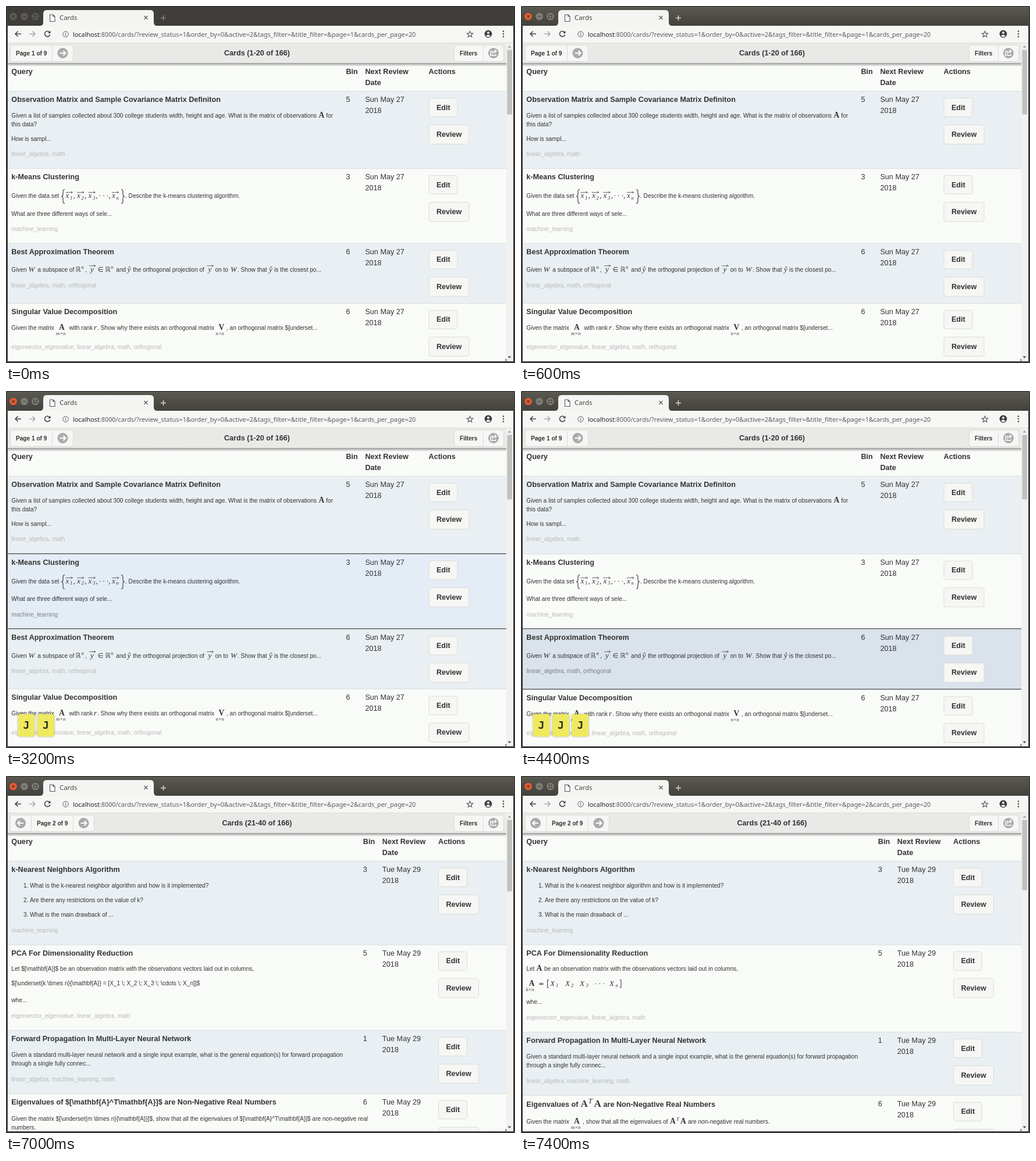
Animation of 875x614 px, one loop 8000 ms. Source, as an HTML page:

```html
<!DOCTYPE html>
<html lang="en">
<head>
<meta charset="utf-8">
<title>Cards</title>
<style>
html, body { margin: 0; width: 100%; height: 100%; overflow: hidden; background: #3c3b37; }
svg { display: block; width: 875px; height: 614px; }
text { font-family: "Liberation Sans", Arial, sans-serif; font-size: 10.12px; fill: #333; white-space: pre; }
.big { font-size: 12.65px; }
.bold { font-weight: bold; }
.mid { text-anchor: middle; }
.tag { fill: #b9bab9; }
.tag.on { fill: #7c7f82; }
.ui { font-family: "Noto Sans", "Open Sans", sans-serif; font-size: 10.85px; fill: #5c5c5c; }
.tab { font-size: 11.4px; fill: #444; }
.m, .mb, .sub { font-family: "Liberation Serif", Times, serif; font-size: 13.2px; }
.m, .sub { font-style: italic; }
.mb { font-weight: bold; font-size: 13.6px; }
.sub { font-size: 8.6px; }
.bb { font-family: "DejaVu Sans", sans-serif; font-size: 11.5px; }
.h { font-size: 17px; }
.key { font: bold 18px "DejaVu Sans Mono", monospace; fill: #2e2e20; text-anchor: middle; }
</style>
</head>
<body>
<svg id="stage" viewBox="0 0 875 614"></svg>
<script>
const escapeText = s => s.replace(/&/g, '&amp;').replace(/</g, '&lt;');
const text = (x, y, s, cls = '') => `<text x="${x}" y="${y}" class="${cls}">${escapeText(s)}</text>`;
const box = (x, y, w, h, fill, more = '') =>
  `<rect x="${x}" y="${y}" width="${w}" height="${h}" fill="${fill}" ${more}/>`;
const path = (d, stroke, width = 1, fill = 'none') =>
  `<path d="${d}" stroke="${stroke}" stroke-width="${width}" fill="${fill}"/>`;
const disc = (x, y, r, fill, more = '') => `<circle cx="${x}" cy="${y}" r="${r}" fill="${fill}" ${more}/>`;
const button = (x, y, w, h) => box(x + .5, y + .5, w - 1, h - 1, '#f6f7f4', 'stroke="#dadcd9" rx="3.5"');

// Text on one baseline: any number of [x, string, class]
const line = (y, ...parts) => parts.map(([x, s, cls]) => text(x, y, s, cls)).join('');
const left = 9.3;
const under = (x, y, letter, size) => text(x + 5, y, letter, 'mb') + text(x, y + 9, size, 'sub');
const vec = (x, y, w = 12) =>
  path(`M${x} ${y}h${w}m-3 -2q1 1.5 3 2q-2 .5 -3 2`, '#444', .8);
const brace = (x, y, dir) =>
  path(`M${x + 3 * dir} ${y}q${-3 * dir} 0 ${-3 * dir} 4v4q0 4 ${-3 * dir} 4q${3 * dir} 0 ${3 * dir} 4v4q0 4 ${3 * dir} 4`, '#333', 1.1);
const gram = (x, y, cls = '') =>
  cls ? line(y, [x, 'A', 'mb h'], [x + 23, 'A', 'mb h']) + text(x + 13, y - 6, 'T', 'm')
      : line(y, [x, 'A', 'mb'], [x + 18, 'A', 'mb']) + text(x + 11, y - 4.5, 'T', 'sub');

// Row bodies are drawn relative to the row's top edge.
const firstPage = {
  heading: 'Cards (1-20 of 166)', columns: [584.4, 617.4, 726.5], date: 'Sun May 27',
  tops: [146.5, 279.5, 408.3, 511.3], thumb: 111,
  rows: [
    { title: 'Observation Matrix and Sample Covariance Matrix Definiton', bin: 5,
      tags: 'linear_algebra, math', tagY: 111.5,
      body: line(45.5, [left, 'Given a list of samples collected about 300 college students width, height and age. What is the matrix of observations'], [537.5, 'A', 'mb'], [550.3, 'for'])
        + text(left, 60.5, 'this data?') + text(left, 85.5, 'How is sampl...') },
    { title: 'k-Means Clustering', bin: 3, tags: 'machine_learning', tagY: 107.5,
      body: text(left, 50.5, 'Given the data set') + brace(98, 36, 1) + brace(201, 36, -1)
        + ['1', '2', '3', 'n'].map((n, i) => {
            const x = [102.5, 122, 141.5, 182][i];
            return text(x, 50.5, 'x', 'm') + text(x + 7.5, 53, n, 'sub') + vec(x, 41)
              + (i < 3 ? text(x + 13, 50.5, ',', 'm') : '');
          }).join('')
        + text(159.5, 50.5, '· · ·,', 'm')
        + text(205, 50.5, '. Describe the k-means clustering algorithm.')
        + text(left, 81, 'What are three different ways of sele...') },
    { title: 'Best Approximation Theorem', bin: 6, tags: 'linear_algebra, math, orthogonal', tagY: 75.5,
      body: line(48.7, [left, 'Given'], [38.5, 'W', 'm'], [54.3, 'a subspace of'], [119.5, 'ℝ', 'bb'], [136, ','],
          [145, 'y', 'm'], [157.5, '∈', 'bb'], [170.5, 'ℝ', 'bb'], [189.3, 'and'], [208.5, 'ŷ', 'm'],
          [218.3, 'the orthogonal projection of'], [347.5, 'y', 'm'], [359.5, 'on to'], [386, 'W', 'm'],
          [398, '. Show that'], [452, 'ŷ', 'm'], [461, 'is the closest po...'])
        + line(44, [129.5, 'n', 'sub'], [180, 'n', 'sub']) + vec(143, 38.5, 11) + vec(345.5, 38.5, 11) },
    { title: 'Singular Value Decomposition', bin: 6,
      tags: 'eigenvector_eigenvalue, linear_algebra, math, orthogonal', tagY: 78.5,
      body: line(45.5, [left, 'Given the matrix'], [108.5, 'with rank'], [151, 'r', 'm'],
          [157, '. Show why there exists an orthogonal matrix'], [379, ', an orthogonal matrix $[underset...'])
        + under(86, 45.5, 'A', 'm×n') + under(360.5, 45.5, 'V', 'n×n') }
  ]
};

const secondPage = raw => ({
  heading: 'Cards (21-40 of 166)', columns: [613.8, 646.8, 743], date: 'Tue May 29',
  tops: raw ? [146.5, 290.3, 437.5, 546] : [146.5, 290.3, 440.5, 549.3], thumb: raw ? 123 : 121,
  rows: [
    { title: 'k-Nearest Neighbors Algorithm', bin: 3, tags: 'machine_learning', tagY: 122,
      body: ['What is the k-nearest neighbor algorithm and how is it implemented?',
             'Are there any restrictions on the value of k?',
             'What is the main drawback of ...']
        .map((s, i) => line(45.5 + 25 * i, [30, `${i + 1}.`], [41, s])).join('') },
    { title: 'PCA For Dimensionality Reduction', bin: 5,
      tags: 'eigenvector_eigenvalue, linear_algebra, math', tagY: raw ? 125.5 : 128.5,
      body: (raw
        ? text(left, 45, 'Let $[\\mathbf{A}]$ be an observation matrix with the observations vectors laid out in columns,')
          + text(left, 70, '$[\\underset{k \\times n}{\\mathbf{A}} = [X_1 \\; X_2 \\; X_3 \\; \\cdots \\; X_n]]$')
        : line(45, [left, 'Let'], [26.5, 'A', 'mb'], [40, 'be an observation matrix with the observations vectors laid out in columns,'])
          + under(8.5, 70.5, 'A', 'k×n')
          + line(70.5, [30, '=', 'bb'], [50, 'X', 'm'], [76, 'X', 'm'], [101, 'X', 'm'], [127, '· · ·', 'm'], [152, 'X', 'm'])
          + line(73, [60, '1', 'sub'], [86, '2', 'sub'], [111.5, '3', 'sub'], [162.5, 'n', 'sub'])
          + path('M48 60.5h-2.5v13h2.5M169.5 60.5h2.5v13h-2.5', '#333'))
        + text(left, raw ? 99 : 102, 'whe...') },
    { title: 'Forward Propagation In Multi-Layer Neural Network', bin: 1,
      tags: 'linear_algebra, machine_learning, math', tagY: 87.5,
      body: text(left, 45.5, 'Given a standard multi-layer neural network and a single input example, what is the general equation(s) for forward propagation')
        + text(left, 60.5, 'through a single fully connec...') },
    { title: raw ? 'Eigenvalues of $[\\mathbf{A}^T\\mathbf{A}]$ are Non-Negative Real Numbers' : '', bin: 6, tags: '', tagY: 90,
      body: raw
        ? text(left, 47, 'Given the matrix $[\\underset{m \\times n}{\\mathbf{A}}]$, show that all the eigenvalues of $[\\mathbf{A}^T\\mathbf{A}]$ are non-negative real')
          + text(left, 62, 'numbers.')
        : line(19.7, [left, 'Eigenvalues of', 'big bold'], [141.5, 'are Non-Negative Real Numbers', 'big bold']) + gram(102.5, 19.7, 'h')
          + line(48.3, [left, 'Given the matrix'], [106, ', show that all the eigenvalues of'], [287, 'are non-negative real numbers.'])
          + under(86, 48.3, 'A', 'm×n') + gram(256, 48.3) }
  ]
});

function drawRows({ rows, tops, columns: [binX, dateX, actX], date }, selected) {
  const top = i => i < rows.length ? tops[i] + .79 * Math.min(i, selected + 1) : 620;
  let out = '', rules = '';
  rows.forEach((row, i) => {
    const y = top(i), on = i === selected;
    const fill = i % 2 ? (on ? '#e4ecf6' : '#f9fbf8') : (on ? '#dae2eb' : '#e9eff2');
    out += box(3, y, 857, top(i + 1) - y, fill)
      + `<g transform="translate(0 ${y})">`
      + line(18.5, [left, row.title, 'big bold'], [binX, String(row.bin), 'big'], [dateX, date, 'big'])
      + text(dateX, 37.5, '2018', 'big') + row.body
      + text(left, row.tagY, row.tags, 'tag' + (on ? ' on' : ''))
      + button(actX, 11.5, 50, 33) + text(actX + 13.4, 32, 'Edit', 'big bold')
      + button(actX, 57.5, 70, 34) + text(actX + 13.4, 78.5, 'Review', 'big bold') + '</g>';
    const dark = on || i === selected + 1 && selected >= 0;
    rules += dark ? box(3, Math.floor(y - 1), 857, 1.6, '#666a6d')
                  : box(3, Math.round(y - .5), 857, 1, '#dcdfdd');
  });
  return out + rules;
}

function arrowDisc(x, dir) {
  return disc(x, 81, 9, '#a9aaa9') + path(`M${x - 5 * dir} 81h${9 * dir}M${x + dir} 77l${4 * dir} 4l${-4 * dir} 4`, '#fff', 2);
}

function drawHeader({ heading, columns: [binX, dateX, actX] }, number) {
  const shift = number === 2 ? 36 : 0;
  return box(3, 98, 857, 6, 'url(#shadow)') + box(3, 64, 857, 34, '#e9eae8')
    + button(7, 67, 109 + shift, 29)
    + path(`M${80 + shift - .5} 67v29` + (shift ? 'M43.5 67v29' : ''), '#dadcd9')
    + (shift ? arrowDisc(25, -1) : '') + arrowDisc(97.5 + shift, 1)
    + text(17 + shift, 84.5, `Page ${number} of 9`, 'bold')
    + text(431.5, 85, heading, 'big bold mid')
    + button(770, 67, 86, 29) + path('M820.5 67v29', '#dadcd9')
    + text(780, 84.5, 'Filters', 'bold')
    + disc(838, 81, 9, '#a9aaa9')
    + path('M837 78h-4v7h9v-2M836 83q0 -5 6 -5M840 75l3 3l-3 3', '#fff', 1.4)
    + line(117, [left, 'Query', 'big bold'], [binX, 'Bin', 'big bold'], [dateX, 'Next Review', 'big bold'], [actX, 'Actions', 'big bold'])
    + text(dateX, 136, 'Date', 'big bold');
}

function drawWindow({ focus, loading, number }) {
  const glyph = focus ? '#3b3a36' : '#35342f', knob = focus ? '#7f7d75' : '#5d5b54';
  const frame = focus ? '#45443f' : '#3c3b37';
  const star = Array.from({ length: 10 }, (_, i) => {
    const a = i * Math.PI / 5, r = i % 2 ? 2.4 : 5.5;
    return `${797.5 + r * Math.sin(a)} ${48.8 - r * Math.cos(a)}`;
  }).join('L');
  return box(0, 0, 875, 34, focus ? 'url(#bar)' : '#3f3e3a')
    + box(0, 34, 3, 580, frame) + box(872, 34, 3, 580, frame) + box(0, 611, 875, 3, frame)
    + path('M.5 613.5V4Q.5 .5 4 .5H871Q874.5 .5 874.5 4V613.5Z', '#2c2b28')
    + disc(12.5, 18, 6.3, focus ? '#e9592f' : knob) + disc(31.5, 18, 6.3, knob) + disc(50.5, 18, 6.3, knob)
    + path('M10.5 16l4 4m0 -4l-4 4M28.5 18h6M48 15.5h5v5h-5z', glyph, 1.2)
    + path('M58 34Q64 34 64 28V13Q64 7 70 7H248Q254 7 254 13V28Q254 34 260 34Z', 'none', 0, '#f4f4f2')
    + (loading ? path('M79.5 15.5a5 5 0 1 0 5 5', '#777', 1.6)
               : path('M75.5 15h5.5l3 3v8.5h-8.5zM81 15v3h3', '#555', 1.1, '#fff'))
    + text(92, 24, 'Cards', 'ui tab') + path('M237.5 17l6 6m0 -6l-6 6', '#555', 1.2)
    + path('M266 20.5h9M270.5 16v9', focus ? '#d8d6cf' : '#8b8983', 1.5)
    + box(3, 34, 869, 30, '#f6f6f5') + box(3, 63, 869, 1, '#dcdcda')
    + path('M26 48h-10m4.5 -4.5l-4.5 4.5l4.5 4.5', '#444', 1.6)
    + path('M40 48h10m-4.5 -4.5l4.5 4.5l-4.5 4.5', '#aaa', 1.6)
    + (loading ? path('M66.5 43.5l9 9m0 -9l-9 9', '#444', 1.6)
               : path('M75 45.2a4.7 4.7 0 1 0 .7 4', '#444', 1.6) + path('M76.5 42.5v4.5h-4.5z', 'none', 0, '#444'))
    + disc(102.5, 48.5, 4.8, 'none', 'stroke="#5c5c5c"') + path('M102.5 47.8v3.4M102.5 45.6v1.1', '#5c5c5c', 1.2)
    + `<text x="115" y="52.6" class="ui"><tspan fill="#222">localhost</tspan>${escapeText(
        `:8000/cards/?review_status=1&order_by=0&active=2&tags_filter=&title_filter=&page=${number}&cards_per_page=20`)}</text>`
    + path(`M${star}Z`, '#555', 1.1)
    + disc(829, 48, 6.4, '#3f3f3f') + disc(829, 46, 2, '#f6f6f5')
    + path('M825 51.5q4 -4 8 0q-4 3.5 -8 0', 'none', 0, '#f6f6f5')
    + [43.5, 48, 52.5].map(y => disc(855, y, 1.3, '#444')).join('');
}

function drawKeys(keys) {
  return [...keys].map((key, i) => {
    const x = 20.8 + 33.4 * i;
    return box(x, 555.7, 28.5, 38.5, '#efe95e', 'rx="3.5" filter="url(#lift)"') + text(x + 14.2, 581, key, 'key');
  }).join('');
}

const defs = `<defs>
  <linearGradient id="bar" x2="0" y2="1"><stop stop-color="#5b5a52"/><stop offset="1" stop-color="#42413c"/></linearGradient>
  <linearGradient id="shadow" x2="0" y2="1"><stop stop-color="#777" stop-opacity=".75"/><stop offset="1" stop-color="#777" stop-opacity="0"/></linearGradient>
  <filter id="lift" x="-30%" y="-30%" width="160%" height="160%">
    <feDropShadow dx="0" dy="0" stdDeviation="1.8" flood-color="#000" flood-opacity=".45"/></filter>
</defs>`;

function draw(state) {
  const { page, selected, keys, shown } = state;
  return defs + box(0, 0, 875, 614, '#f9fbf8')
    + drawRows(page, selected) + drawHeader(page, shown)
    + box(860, 64, 12, 547, '#f1f1f0') + box(861.5, 75.5, 8.5, page.thumb, '#c1c1c0')
    + path('M862.5 71.5l3 -3.5l3 3.5z', 'none', 0, '#a0a0a0') + path('M862.5 602.5l3 3.5l3 -3.5z', 'none', 0, '#505050')
    + drawKeys(keys) + drawWindow(state) + box(859, 607, 1, 4, '#222');
}

// Each step keeps everything it does not change from the one before.
const steps = [
  { at: 0, focus: false, selected: -1, keys: '', page: firstPage, shown: 1, number: 1, loading: false },
  { at: 600, focus: true },
  { at: 2600, selected: 0, keys: 'J' },
  { at: 3200, selected: 1, keys: 'JJ' },
  { at: 4400, selected: 2, keys: 'JJJ' },
  { at: 5800, keys: 'JJJL' },
  { at: 6800, number: 2, loading: true },
  { at: 7000, loading: false, page: secondPage(true), shown: 2, selected: -1, keys: '' },
  { at: 7400, page: secondPage(false) }
];
steps.forEach((step, i) => { steps[i] = { ...steps[i - 1], ...step }; });

const stage = document.getElementById('stage');
const start = performance.now();
let current;
function tick() {
  const time = (performance.now() - start) % 8000;
  const step = steps.findLast(s => s.at <= time);
  if (step !== current) stage.innerHTML = draw(current = step);
  requestAnimationFrame(tick);
}
tick();
</script>
</body>
</html>
```
